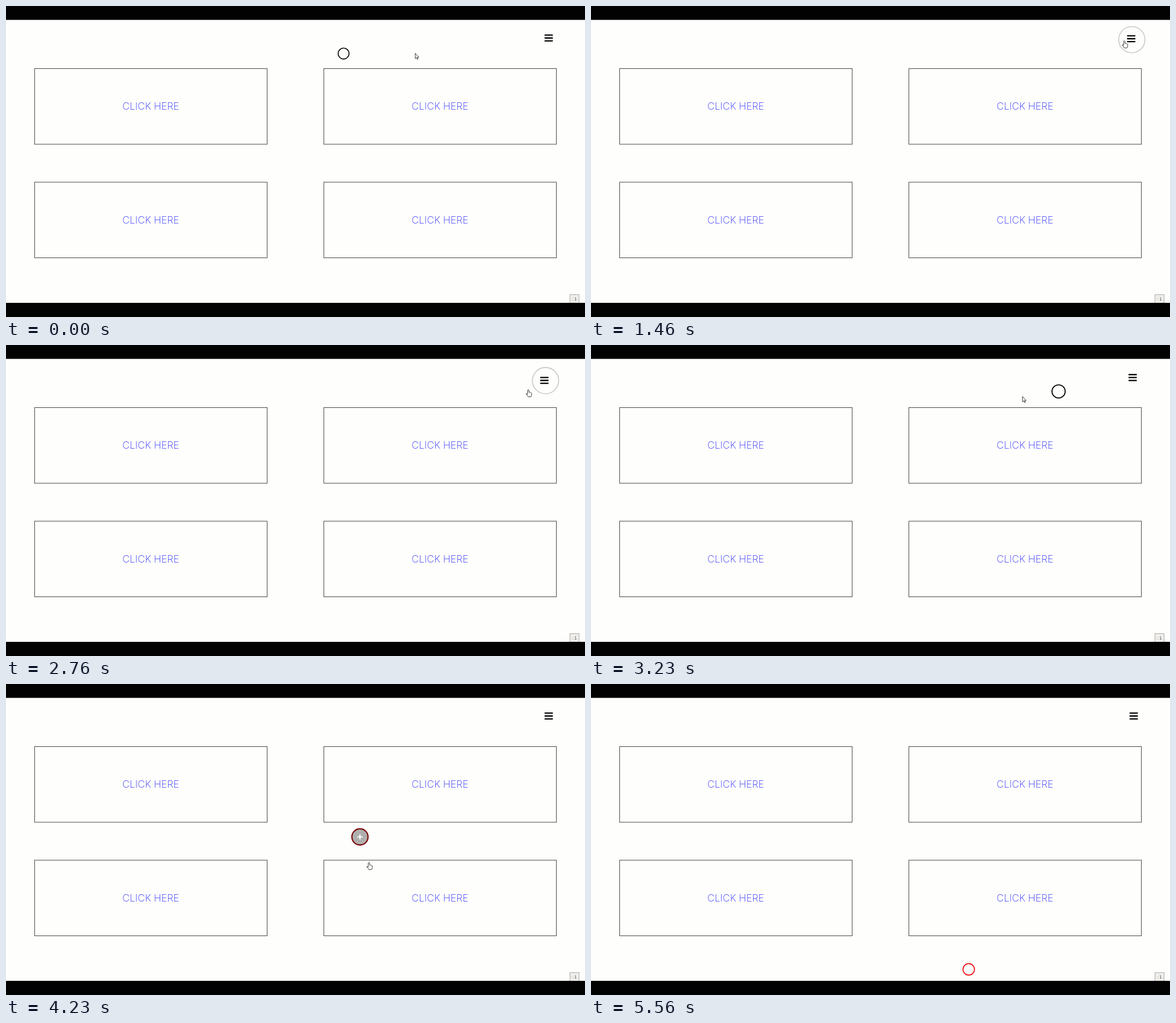
Recreate the animation shown at these times as an HTML page. Size 1021 by 549 pixels, loop 5630 ms.

```html
<!DOCTYPE html>
<html lang="en">
<head>
<meta charset="utf-8">
<title>Cursor follower</title>
<style>
  html, body { margin: 0; width: 100%; height: 100%; overflow: hidden; background: #fefefc; }
  svg { display: block; width: 100%; height: 100%; }
  .label { font: 200 17.5px Inter, sans-serif; fill: #3030ff; text-anchor: middle; }
  .badge { font: 7.5px "DejaVu Sans", sans-serif; fill: #555; }
  #cursor path { fill: #fff; stroke: #222; stroke-width: .9; stroke-linejoin: round; }
</style>
</head>
<body>
<svg viewBox="0 0 1021 549">
  <defs>
    <g id="card">
      <rect x=".5" y=".5" width="410" height="133.5" fill="none" stroke="#444"/>
      <text class="label" x="205.3" y="73.4">CLICK HERE</text>
    </g>
  </defs>
  <rect width="1021" height="549" fill="#fefefc"/>
  <use href="#card" x="50" y="110"/>
  <use href="#card" x="560" y="110"/>
  <use href="#card" x="50" y="310.5"/>
  <use href="#card" x="560" y="310.5"/>
  <g id="follower">
    <circle id="ring"/>
    <path id="plus" d="M-4.5 0H4.5M0-4.5V4.5" stroke="#fff" stroke-width="2"/>
  </g>
  <path id="menu" d="M-7.3-5.2H7.3M-7.3 0H7.3M-7.3 5.2H7.3" stroke="#000" stroke-width="2.3"/>
  <rect x="994.5" y="509.5" width="16" height="15" fill="#f0eeea" stroke="#aaa"/>
  <text class="badge" x="997" y="520"><tspan fill="#c9b8a6">::</tspan>1</text>
  <g id="cursor">
    <path id="arrow" d="M0 0V9.5L2.2 7.6L3.7 10.8L5 10.2L3.6 7.1H6.4Z"/>
    <path id="hand" d="M-1.2 8.6V1.2Q0-.6 1.2 1.2V5Q2.6 4.2 3.3 5.4Q4.4 4.8 4.9 6Q5.8 5.8 5.8 7V10Q5.6 11.8 4.6 13H0Q-.8 11.4-4 8Q-3.4 6.4-1.2 8.6Z"/>
  </g>
  <path fill="#020203" d="M0 0H1021V24.5H0ZM0 524H1021V549H0Z"/>
</svg>
<script>
const LOOP = 5630;
const FOLLOW = 175;   // lag of the follower's place and size, in ms
const SAMPLES = 200;
const $ = id => document.getElementById(id);

// Where the hand moves the pointer: time, x, y
const stops = [
  [-800, 105, 85], [0, 721, 83.5], [300, 900, 69], [560, 947, 60], [1460, 940.5, 61],
  [1720, 932, 74], [2380, 982, 72], [2520, 924, 76], [2760, 921, 78.5], [2960, 857, 80],
  [3470, 672, 112], [3560, 637, 151], [3700, 616, 168.5], [3850, 598, 190], [4080, 619, 285],
  [4230, 640, 314.5], [4760, 657, 405], [5000, 665.5, 461], [5360, 666, 499], [5560, 667, 527]
];

// Monotone cubic through the stops
function along(t, axis) {
  const last = stops.length - 1;
  t = Math.max(stops[0][0], Math.min(stops[last][0], t));
  const i = Math.max(0, stops.findIndex(s => s[0] >= t) - 1);
  const rate = j => {
    const k = Math.max(0, Math.min(last - 1, j));
    return (stops[k + 1][axis] - stops[k][axis]) / (stops[k + 1][0] - stops[k][0]);
  };
  const slope = j => {
    const a = rate(j - 1), b = rate(j);
    return a * b <= 0 ? 0 : 2 * a * b / (a + b);
  };
  const span = stops[i + 1][0] - stops[i][0], u = (t - stops[i][0]) / span, v = 1 - u;
  return stops[i][axis] * (1 + 2 * u) * v * v + stops[i + 1][axis] * u * u * (1 + 2 * v)
    + span * u * v * (slope(i) * v - slope(i + 1) * u);
}

// Exponential lag: the mean of past values, weighted by exp(-age / tau)
function lagged(value, t, tau) {
  let sum = 0;
  for (let i = 0; i < SAMPLES; i++) {
    sum += value(t + tau * Math.log((i + .5) / SAMPLES));
  }
  return sum / SAMPLES;
}

const overMenu = t => t > 540 && t < 2900;
const overCard = t => t > 3490 && t < 4020 || t > 4210 && t < 4990;
const isRed = t => overCard(t) || t >= 4990;
const pull = (t, axis, rest, strength) => rest + strength * (along(t, axis) - rest);

const followerTarget = (t, axis) => overMenu(t) ? pull(t, axis, [0, 957, 59][axis], .22) : along(t, axis);
const menuTarget = (t, axis) => {
  const rest = [0, 957, 56.5][axis];
  return overMenu(t) ? pull(t, axis, rest, .3) : rest;
};
const radiusTarget = t => overMenu(t) ? 24 : overCard(t) ? 22.5 : 10.5;

const place = (id, x, y) => $(id).setAttribute("transform", `translate(${x} ${y})`);
const placeLagged = (id, target, t) =>
  place(id, ...[1, 2].map(axis => lagged(s => target(s, axis), t, FOLLOW)));

function draw() {
  const t = performance.now() % LOOP;
  const pointing = overMenu(t) || overCard(t);
  place("cursor", along(t, 1), along(t, 2));
  $("hand").style.display = pointing ? "" : "none";
  $("arrow").style.display = pointing ? "none" : "";
  placeLagged("menu", menuTarget, t);
  placeLagged("follower", followerTarget, t);

  const radius = lagged(radiusTarget, t, FOLLOW);
  const fill = lagged(overCard, t, 70);
  const gray = lagged(overMenu, t, 70);
  const red = lagged(isRed, t, 30);
  const width = (.6 + .1 * radius) * (1 - gray) + 1.6 * gray;
  const dark = 200 * gray;
  const ring = $("ring");
  ring.setAttribute("r", radius - width / 2);
  ring.setAttribute("stroke-width", width);
  ring.setAttribute("stroke", `rgb(${dark + 240 * red},${dark + 16 * red},${dark + 16 * red})`);
  ring.setAttribute("fill", `rgba(0,0,0,${fill})`);
  $("plus").style.display = fill > .01 ? "" : "none";
  requestAnimationFrame(draw);
}
draw();
</script>
</body>
</html>
```
